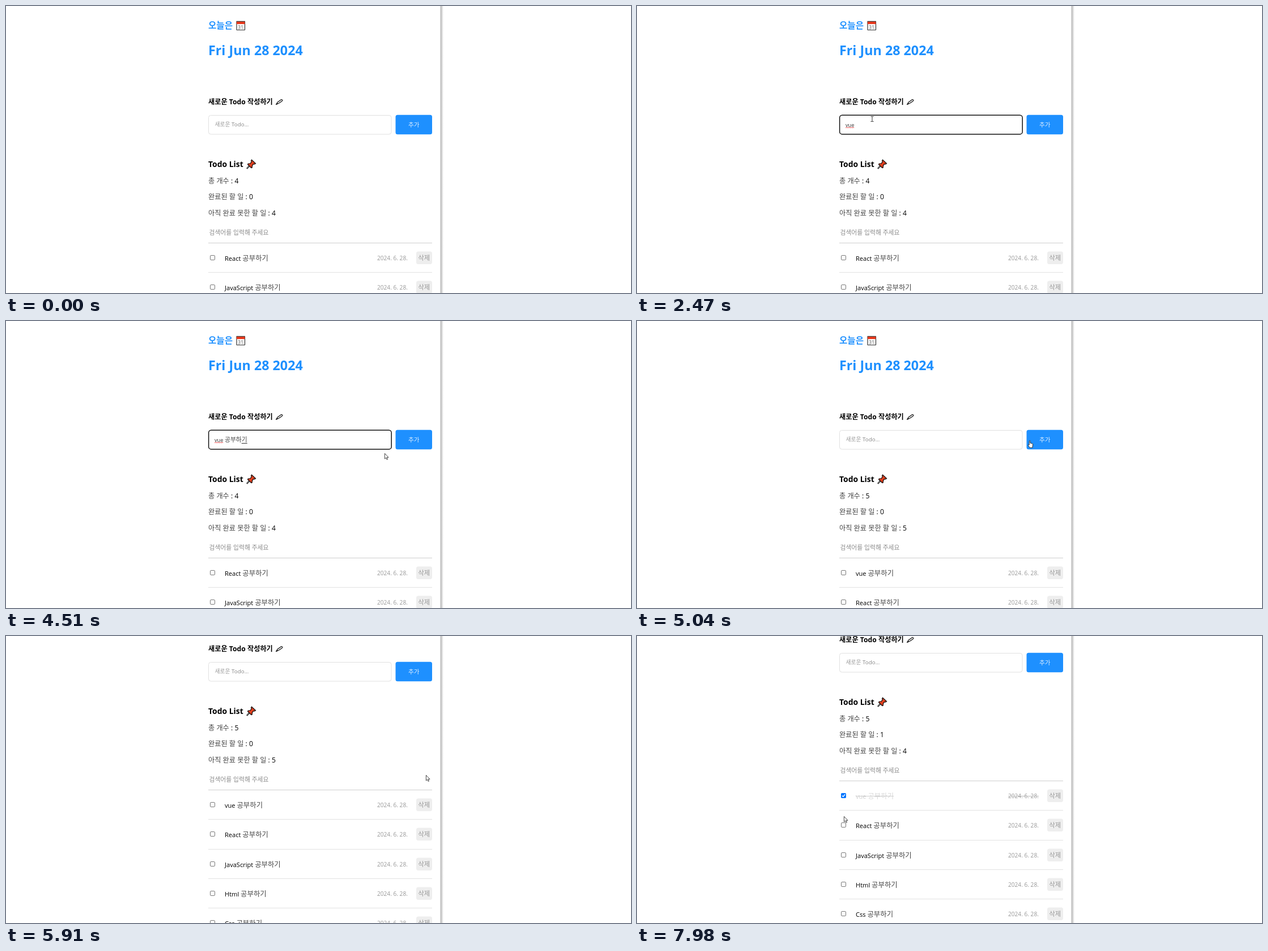
Recreate the animation shown at these times as an HTML page with a canvas. Size 1103x508 px, loop 8 s.

```html
<!DOCTYPE html>
<html lang="ko">
<head>
<meta charset="utf-8">
<title>Todo</title>
<style>
html, body { margin: 0; width: 100%; height: 100%; overflow: hidden; background: #fff; }
canvas { display: block; }
</style>
</head>
<body>
<canvas id="stage" width="1103" height="508"></canvas>
<script>
const LOOP = 8000, STEP = 67, ROW = 52.35;
const LEFT = 357, RIGHT = 752, BLUE = '#1e90ff';
const ctx = document.getElementById('stage').getContext('2d');

// [time, value] lists hold each value until the next time
const typed = [
  [0, ''], [1270, 'v'], [1610, 'vu'], [1700, 'vue'], [1870, 'vue '],
  [2670, 'vue ㄱ'], [2770, 'vue 고'], [2870, 'vue 공'], [3030, 'vue 공ㅂ'],
  [3100, 'vue 공부'], [3290, 'vue 공붛'], [3380, 'vue 공부하'],
  [3560, 'vue 공부학'], [3770, 'vue 공부하기'], [5040, '']
];
const scrolls = [[0, 0], [5780, 73], [5910, 147], [6190, 163]];

// Pointer moves: [time, x, y] points, linear in between
const moves = [
  [[70, 830, 446], [350, 331, 233], [490, 408, 195], [560, 415, 200]],
  [[4173, 415, 200], [4508, 668, 234], [4776, 690, 211]],
  [[5383, 690, 211], [5584, 741, 246]],
  [[6360, 741, 246], [6829, 358, 290], [7164, 350, 274]],
  [[7320, 360, 279]],
  [[7573, 360, 279], [7774, 354, 300], [7975, 365, 319]]
];

const held = (list, t) => list.filter(k => k[0] <= t).pop()[1];

function pointerAt(t) {
  const path = moves.filter(m => m[0][0] <= t).pop();
  if (!path) return null;
  const start = path[0][0];
  const q = start + Math.floor((t - start) / STEP) * STEP;
  const next = path.findIndex(k => k[0] > q);
  if (next < 0) return path[path.length - 1].slice(1);
  const [a, b] = [path[next - 1], path[next]];
  const p = (q - a[0]) / (b[0] - a[0]);
  return [a[1] + (b[1] - a[1]) * p, a[2] + (b[2] - a[2]) * p];
}

// Draws mixed Latin and Hangul text and returns its end
function text(s, x, y, size, color, { weight = 400, hangul = size, soft = color } = {}) {
  for (const run of s.match(/[ㄱ-ㅎ가-힣]+|[^ㄱ-ㅎ가-힣]+/g) || []) {
    const isHangul = /[ㄱ-ㅎ가-힣]/.test(run);
    ctx.fillStyle = isHangul ? soft : color;
    ctx.font = isHangul
      ? `${weight === 700 ? 700 : 300} ${hangul}px "Noto Sans CJK KR", "Noto Sans CJK", sans-serif`
      : `${weight} ${size}px "Open Sans", "Noto Sans", sans-serif`;
    ctx.fillText(run, x, y);
    x += ctx.measureText(run).width;
  }
  return x;
}

function box(x, y, w, h, r, fill, stroke, line = 1) {
  ctx.beginPath();
  ctx.roundRect(x, y, w, h, r);
  if (fill) { ctx.fillStyle = fill; ctx.fill(); }
  if (stroke) { ctx.strokeStyle = stroke; ctx.lineWidth = line; ctx.stroke(); }
}

function shape(d, fill, stroke, line = 1) {
  const path = new Path2D(d);
  if (fill) { ctx.fillStyle = fill; ctx.fill(path); }
  if (stroke) { ctx.strokeStyle = stroke; ctx.lineWidth = line; ctx.stroke(path); }
}

function rule(x1, x2, y, color) {
  ctx.fillStyle = color;
  ctx.fillRect(x1, y, x2 - x1, 1);
}

function heading() {
  text('오늘은', LEFT, 40, 15.6, BLUE, { weight: 700 });
  box(407, 27.5, 14.5, 15, 0.5, '#fff', '#333', 1.2);
  ctx.fillStyle = '#e8391d';
  ctx.fillRect(407, 27.5, 14.5, 4.5);
  shape('M406.5 27.2H422', null, '#333', 1);
  text('31', 409.3, 40.6, 8.5, '#555');
  text('Fri Jun 28 2024', LEFT, 87, 23.3, BLUE, { weight: 700 });
}

function squiggle(x1, x2, y) {
  let d = `M${x1} ${y}`;
  for (let x = x1 + 1.5, i = 1; x <= x2; x += 1.5, i++) d += `L${x} ${y - (i % 2) * 1.5}`;
  shape(d, null, '#e33', 0.9);
}

function form(t) {
  text('새로운 Todo 작성하기', LEFT, 174, 12.2, '#000', { weight: 700 });
  shape('M477 174L479 170.5L486 165.5L488 166.5L487 168.5L480 173Z', '#fff', '#111', 1.1);
  shape('M476.5 174.5L479.5 172', null, '#111', 1.5);

  if (t >= 630 && t < 4970) box(357.6, 193.3, 322.6, 33.6, 4.5, '#fff', '#111', 1.5);
  else box(357.5, 193.5, 322.5, 33.5, 4, '#fff', '#e0e0e0');

  const value = held(typed, t);
  if (value) {
    const [latin, hangul] = value.split(' ');
    text(latin, 368, 213.5, 9.2, '#333');
    if (t >= 1870) squiggle(368, 383, 216);
    if (hangul) {
      const end = text(hangul, 386, 214, 10.8, '#444');
      if (t < 4970) rule(end - 10, end, 216, '#333');
    }
  } else {
    text('새로운 Todo...', 368.5, 213.3, 9.8, '#858585', { soft: '#999' });
  }
  const caret = (t >= 630 && t < 1100) || (t >= 1270 && t < 2470);
  if (caret) {
    const x = { '': 368, v: 373, vu: 379, vue: 383 }[value] ?? 385;
    ctx.fillStyle = '#111';
    ctx.fillRect(x, 204, 1, 12);
  }

  box(687.5, 192.8, 64.5, 34.4, 3.5, BLUE);
  text('추가', 710, 214.4, 10.6, '#e4f1ff');
}

function summary(t) {
  text('Todo List', LEFT, 285.3, 13.9, '#000', { weight: 700 });
  shape('M425 288L431.5 280.5', null, '#111', 2.4);
  shape('M425.5 287.5L431 281', null, '#ccc', 0.8);
  shape('M433.5 272.3L440.5 278.7L438.7 280L437 279.5L434.5 282.5L434.3 286' +
    'L432.8 286.5L426.6 280.5L427.3 279L430.8 278.8L433.3 276L432.5 274Z', '#e2401f', '#111', 1.2);

  const total = t < 5040 ? 4 : 5, done = t < 7640 ? 0 : 1;
  [`총 개수 : ${total}`, `완료된 할 일 : ${done}`, `아직 완료 못한 할 일 : ${total - done}`]
    .forEach((s, i) => text(s, LEFT, 314.3 + i * 28.1, 12.2, '#000', { weight: 500, soft: '#444' }));
  text('검색어를 입력해 주세요', 358.5, 405.3, 10.8, '#8c8c8c');
  rule(LEFT, RIGHT, 419, '#cfcfcf');
}

function item(name, top, checked, done) {
  const y = Math.round(top);
  if (checked) {
    box(360, y - 5, 9, 9, 1.8, '#0075ff');
    shape(`M362 ${y - 0.5}l1.8 2l3.4 -4.2`, null, '#fff', 1.4);
  } else {
    box(360.5, y - 4.5, 8, 8, 1.6, '#fff', '#767676');
  }
  const end = text(name + ' 공부하기', 386, y + 4.7, 11.1, done ? '#d0d0d0' : '#000',
    { weight: 500, hangul: 12.4, soft: done ? '#d8d8d8' : '#444' });
  text('2024. 6. 28.', 655, y + 3.8, 10.15, '#999');
  if (done) {
    rule(386, end, y, '#cfcfcf');
    rule(655, 709, y, '#bbb');
  }
  box(724, y - 11.5, 28, 22.5, 3.5, '#eee');
  text('삭제', 727.3, y + 4.2, 11.4, '#999');
  rule(LEFT, RIGHT, Math.round(top + 25.2), '#e2e2e2');
}

function pointer(x, y, scroll) {
  const inside = (l, t, r, b) => x >= l && x <= r && y + scroll >= t && y + scroll <= b;
  ctx.save();
  ctx.translate(x, y);
  if (inside(357, 193, 680, 227)) {
    shape('M-2.5 -4.5H-0.7L0 -4L0.7 -4.5H2.5M0 -4V4M-2.5 4.5H-0.7L0 4L0.7 4.5H2.5', null, '#333', 1);
  } else if (inside(687, 193, 752, 227)) {
    shape('M2.2 8.5V1.4Q3.1 0 4 1.4V5L7.8 6Q8.8 6.4 8.6 8L7.8 13.2H3.2L0.4 9.2' +
      'Q0 7.6 1.2 7.8Z', '#fff', '#222', 0.9);
  } else {
    shape('M0.4 0.4V10L2.6 8L4.1 11.4L5.6 10.7L4.1 7.4H7Z', '#fff', '#333', 0.9);
  }
  ctx.restore();
}

function draw(t) {
  ctx.fillStyle = '#fff';
  ctx.fillRect(0, 0, 1103, 508);
  const shade = ctx.createLinearGradient(766, 0, 772, 0);
  shade.addColorStop(0, '#b0b0b0');
  shade.addColorStop(0.4, '#cacaca');
  shade.addColorStop(1, '#fff');
  ctx.fillStyle = shade;
  ctx.fillRect(766.5, 0, 6, 508);

  const scroll = held(scrolls, t);
  ctx.save();
  ctx.translate(0, -scroll);
  heading();
  form(t);
  summary(t);
  const names = ['React', 'JavaScript', 'Html', 'Css'];
  if (t >= 5040) names.unshift('vue');
  names.forEach((name, i) =>
    item(name, 446 + i * ROW, name === 'vue' && t >= 7500, name === 'vue' && t >= 7640));
  ctx.restore();

  const at = pointerAt(t);
  if (at) pointer(...at, scroll);
}

const began = performance.now();
function tick() {
  draw((performance.now() - began) % LOOP);
  requestAnimationFrame(tick);
}
tick();
</script>
</body>
</html>
```
